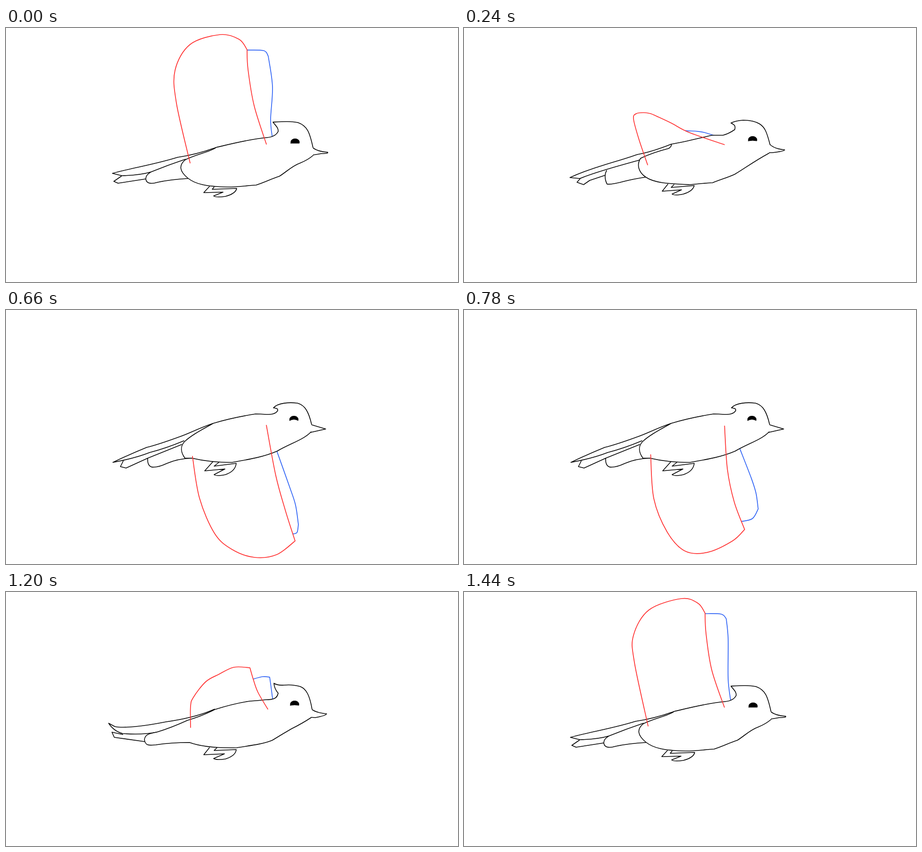
These frames come from a looping animation (960 px wide and 540 px high, 1500 ms). An HTML page:

```html
<!DOCTYPE html>
<html lang="en">
<head>
<meta charset="utf-8">
<title>Flying bird</title>
<style>
  html, body { margin: 0; width: 100%; height: 100%; overflow: hidden; background: #fff; }
  svg { display: block; width: 100vw; height: 100vh; }
  path { fill: none; stroke: #000; stroke-width: 1.6; stroke-linecap: round; stroke-linejoin: round; }
  #body, #cover { fill: #fff; }
  #cover { stroke: none; }
  #eye { fill: #000; stroke-width: 1; }
  #near { stroke: #ff3030; stroke-width: 1.7; }
  #far { stroke: #2f63f5; stroke-width: 1.7; }
</style>
</head>
<body>
<svg viewBox="0 0 960 540">
  <path id="far"/><path id="cover"/><path id="tail"/><path id="body"/><path id="eye"/><path id="near"/>
</svg>
<script>
const LOOP = 1500, STEP = 60;
const times = [0, 240, 420, 660, 960, 1200, 1440];

// Wing outlines from trailing root over the tip to leading root, as x, y pairs.
const nearKeys = [
  [391,287, 362,160, 359,90, 391,35, 455,14, 495,24, 512,46, 514,88, 527,165, 553,247],
  [390,291, 371,235, 360,193, 366,182, 382,180, 396,182, 408,187, 440,202, 478,222, 553,248],
  [393,300, 408,370, 440,431, 487,471, 555,498, 598,502, 611,487, 600,432, 579,358, 552,244],
  [396,311, 411,400, 443,475, 480,509, 528,526, 575,520, 614,491, 593,425, 573,352, 553,245],
  [396,298, 390,378, 411,430, 450,471, 497,453, 557,405, 560,393, 542,358, 538,305, 554,249],
  [392,288, 392,243, 398,224, 424,191, 452,175, 484,160, 518,161, 525,185, 535,213, 556,249],
  [391,285, 362,150, 360,92, 393,38, 462,14, 497,24, 512,45, 514,88, 526,165, 553,245]
];
const farKeys = [
  [506,47, 547,48, 557,60, 566,125, 562,195, 566,235],
  [464,218, 485,219, 498,220, 510,222, 520,225, 536,230],
  [602,449, 611,449, 614,437, 607,395, 594,355, 572,291],
  [608,476, 618,473, 621,456, 615,415, 603,378, 572,291],
  [547,375, 595,364, 621,342, 619,325, 614,308, 600,284],
  [522,186, 545,180, 560,181, 562,195, 564,210, 567,233],
  [508,46, 546,47, 557,57, 561,100, 561,185, 567,235]
];

const eye = (x, y, bend) =>
  `M${x} ${y}v-4q2-5.5 9-5.5t9 5.5v4q-9 ${-bend}-18 0z`;

const high = {
  body: `M652 254C645 222 640 208 620 201C605 198 588 199 567 200C572 207 579 212 578 220
    C574 228 565 232 554 233C518 236 475 247 446 254C438 262 405 268 381 280
    C366 292 369 305 386 319C402 332 425 337 470 338C495 338 512 335 531 334
    C550 328 565 320 581 315C598 304 608 293 625 287Q642 280 652 271`,
  tail: `M446 254C410 267 385 272 364 275C320 289 270 297 226 309L246 314Q285 313 308 306Q345 291 381 279
    M308 306C299 311 295 318 298 325C302 332 312 331 322 328Q350 322 386 320
    M245 315L229 326L238 330L296 321
    M432 337L420 350L461 349L441 357Q446 361 466 358Q488 352 490 341L438 343L442 338
    M652 255Q663 263 683 264Q686 267 670 267Q645 272 630 270Z`,
  eye: eye(605, 245, 0)
};
const falling = {
  body: `M650 248C643 221 639 211 628 204C615 196 601 196 593 196Q577 197 567 202C575 206 577 208 575 216
    Q562 225 550 228L527 228C500 234 470 242 440 247Q442 251 435 256Q400 265 375 277
    C366 291 371 307 386 317C405 330 435 331 480 333Q510 330 528 329
    C545 322 560 318 575 311C597 298 615 284 648 266`,
  tail: `M440 247C415 257 390 265 368 269C330 283 275 295 225 318L246 320C285 304 330 293 375 280
    M303 303C298 311 299 323 304 332Q315 333 340 326Q360 321 386 317
    M247 320L240 328L254 333L267 324L300 313
    M433 332L421 347L462 344L442 353Q447 357 466 353Q486 347 489 335L440 339L446 333
    M650 248Q660 257 681 259Q681 262 655 265L628 265Q627 262 650 248Z`,
  eye: eye(604, 240, 2)
};
const low = {
  body: `M649 243C643 217 635 202 619 198C602 196 578 197 568 208C574 209 578 209 577 214
    C572 222 562 222 553 222Q540 221 530 221C505 225 470 232 440 241
    C415 255 394 266 379 280C369 291 372 304 380 315L395 315C420 321 450 324 480 324
    C520 317 548 312 576 300C603 284 632 276 648 259`,
  tail: `M440 241C410 251 390 262 370 269C340 280 320 287 299 292Q260 308 227 324
    Q275 315 305 303Q340 294 378 278
    M373 286L301 315L255 336L243 333L249 321
    M301 315C300 328 305 335 314 334Q325 334 342 326Q365 316 395 315
    M439 323L422 342L465 338L442 350Q447 354 466 350Q487 343 489 326L442 332L452 324
    M649 244L679 253L648 260L628 260Q626 258 649 244Z`,
  eye: eye(602.5, 235, 5)
};
const rising = {
  body: `M650 249C645 220 638 206 625 201Q608 196 590 198Q577 199 569 194Q570 206 578 215
    C576 227 567 229 552 229Q535 231 518 232C490 236 465 243 443 250
    C420 262 395 270 385 273Q350 289 320 298C302 301 295 304 294 314
    C296 328 305 326 318 325Q350 320 390 320C415 329 450 332 490 331
    C530 325 550 322 566 315Q587 302 606 291Q630 279 648 267`,
  tail: `M443 249C410 264 375 271 340 276C290 286 248 290 231 286L218 279Q229 296 248 301Q290 304 320 298
    M248 303L225 298L230 309L294 318
    M432 331L420 346L464 344L441 354Q447 358 466 355Q488 348 489 335L442 337L448 331
    M650 250Q660 257 681 259Q679 263 657 267L627 265Q626 262 650 250Z`,
  eye: eye(604, 241, 2)
};

// Each pose holds from its start time until the next one.
const poses = [[0, high], [180, falling], [360, low], [840, rising], [1320, high]];

// Smooth interpolation between wing keys, wrapping around the loop.
function shapeAt(keys, t) {
  const n = keys.length;
  const key = i => keys[(i + n) % n];
  const at = i => times[(i + n) % n] + Math.floor(i / n) * LOOP;
  let i = n - 1;
  while (times[i] > t) i--;
  const span = at(i + 1) - at(i), u = (t - at(i)) / span, v = 1 - u;
  return key(i).map((a, k) => {
    const b = key(i + 1)[k];
    const m0 = (b - key(i - 1)[k]) / (at(i + 1) - at(i - 1)) * span;
    const m1 = (key(i + 2)[k] - a) / (at(i + 2) - at(i)) * span;
    return a * (1 + 2 * u) * v * v + m0 * u * v * v + b * u * u * (3 - 2 * u) - m1 * u * u * v;
  });
}

// Curve through the points, with a free corner at the wing tip.
function outline(flat, tip) {
  const pts = [];
  for (let i = 0; i < flat.length; i += 2) pts.push([flat[i], flat[i + 1]]);
  const slope = (i, lo, hi) => {
    const a = pts[Math.max(i - 1, lo)], b = pts[Math.min(i + 1, hi)];
    return [(b[0] - a[0]) / 6, (b[1] - a[1]) / 6];
  };
  let d = 'M' + pts[0];
  for (let i = 0; i < pts.length - 1; i++) {
    const [lo, hi] = i < tip ? [0, tip] : [tip, pts.length - 1];
    const [p, q] = [pts[i], pts[i + 1]];
    const s = slope(i, lo, hi), e = slope(i + 1, lo, hi);
    d += `C${[p[0] + s[0], p[1] + s[1], q[0] - e[0], q[1] - e[1], ...q].map(c => c.toFixed(1))}`;
  }
  return d;
}

const draw = (id, d) => document.getElementById(id).setAttribute('d', d);

let shown = -1;
function render(now) {
  const t = Math.floor((now % LOOP) / STEP) * STEP;
  if (t !== shown) {
    shown = t;
    const pose = poses.filter(p => p[0] <= t).pop()[1];
    for (const part in pose) draw(part, pose[part]);
    const near = outline(shapeAt(nearKeys, t), 6);
    draw('near', near);
    draw('cover', near);
    draw('far', outline(shapeAt(farKeys, t), 2));
  }
  requestAnimationFrame(render);
}

const start = performance.now();
render(0);
requestAnimationFrame(function tick() {
  render = (inner => () => inner(Math.max(0, performance.now() - start)))(render);
  render();
});
</script>
</body>
</html>
```
